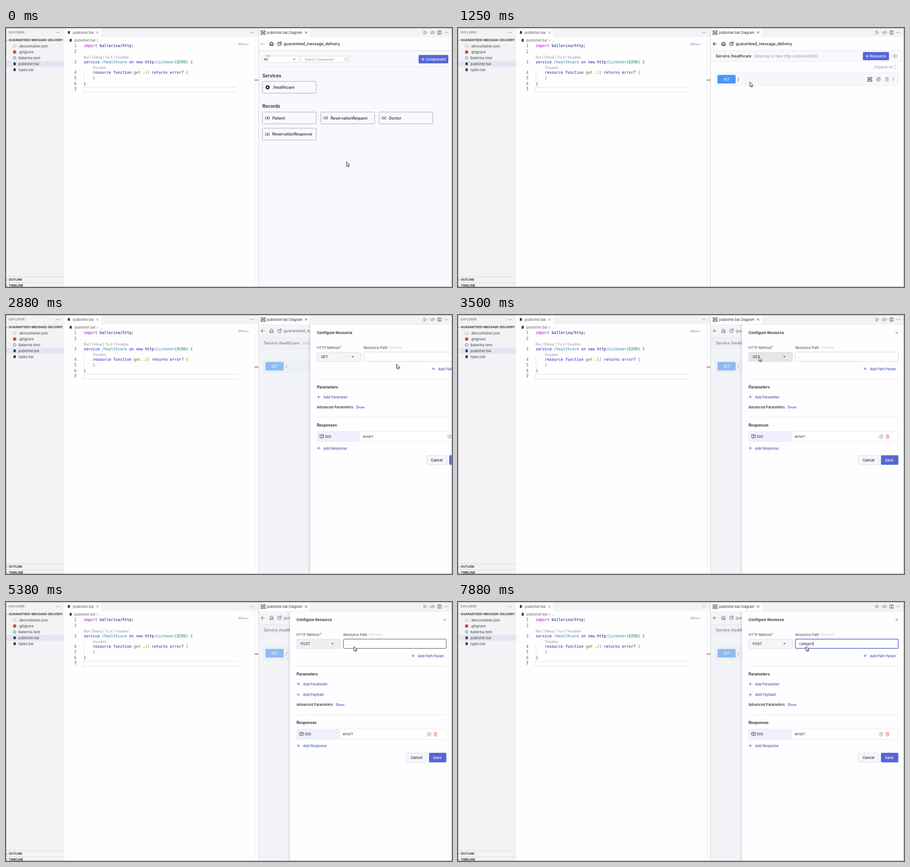
These frames come from a looping animation (981 by 571 pixels, 8000 ms). An HTML page with a canvas:

```html
<!DOCTYPE html>
<html lang="en">
<head>
<meta charset="utf-8">
<title>Service designer</title>
<style>
html, body { margin: 0; width: 100%; height: 100%; overflow: hidden; background: #fff; }
canvas { display: block; width: 981px; height: 571px; }
</style>
</head>
<body>
<canvas id="stage"></canvas>
<script>
const W = 981, H = 571, LOOP = 8000, TICK = 125;
const canvas = document.getElementById('stage');
const ctx = canvas.getContext('2d');
const dpr = window.devicePixelRatio || 1;
canvas.width = Math.round(W * dpr);
canvas.height = Math.round(H * dpr);

const UI = 'Inter, sans-serif', MONO = '"DejaVu Sans Mono", monospace';
const INK = '#25262b', BLUE = '#5567d5', LINK = '#4557bd', RED = '#dd6b4f', LINE = '#dfe1e8';

const clamp = v => Math.max(0, Math.min(1, v));
const mix = (a, b, p) => a + (b - a) * p;
const smooth = p => p * p * (3 - 2 * p);
const span = (t, a, b) => clamp((t - a) / (b - a));

// y is the middle of the capitals
function text(s, x, y, size, color = INK, weight = 400, align = 'left') {
  ctx.font = `${weight} ${size}px ${UI}`;
  ctx.fillStyle = color;
  ctx.textAlign = align;
  ctx.fillText(s, x, y + size * 0.36);
}

function rect(x, y, w, h, color) {
  ctx.fillStyle = color;
  ctx.fillRect(x, y, w, h);
}

function box(x, y, w, h, r, fill, stroke, lw = 0.8) {
  ctx.beginPath();
  ctx.roundRect(x, y, w, h, r);
  if (fill) { ctx.fillStyle = fill; ctx.fill(); }
  if (stroke) { ctx.strokeStyle = stroke; ctx.lineWidth = lw; ctx.stroke(); }
}

// Path drawn around its own centre
function icon(d, x, y, color, lw = 1, fill) {
  const path = new Path2D(d);
  ctx.save();
  ctx.translate(x, y);
  if (fill) { ctx.fillStyle = fill; ctx.fill(path); }
  if (lw) { ctx.strokeStyle = color; ctx.lineWidth = lw; ctx.stroke(path); }
  ctx.restore();
}

function circle(x, y, r, fill, stroke, lw = 1) {
  ctx.beginPath();
  ctx.arc(x, y, r, 0, 7);
  if (fill) { ctx.fillStyle = fill; ctx.fill(); }
  if (stroke) { ctx.strokeStyle = stroke; ctx.lineWidth = lw; ctx.stroke(); }
}

function gear(x, y, r, color, lw) {
  circle(x, y, r * 0.68, null, color, lw);
  for (let i = 0; i < 8; i++) {
    const c = Math.cos(i * Math.PI / 4), s = Math.sin(i * Math.PI / 4);
    icon(`M${c * r * .75} ${s * r * .75}L${c * r} ${s * r}`, x, y, color, lw);
  }
}

function dots(x, y) {
  for (const d of [-3, 0, 3]) circle(x + d, y, 0.7, '#4a4a4e');
}

const PLUS = 'M-3.5 0H3.5M0 -3.5V3.5';
const CROSS = 'M-2.5 -2.5L2.5 2.5M2.5 -2.5L-2.5 2.5';
const CHEVRON = 'M-1.3 -2.6L1.3 0L-1.3 2.6';
const DOWN = 'M-2.8 -1.3H2.8L0 1.5Z', UP = 'M-2.8 1.3H2.8L0 -1.5Z';
const DIAGRAM = 'M-4.5 -4H4.5V-1H-4.5ZM-4.5 1.5H4.5V4.5H-4.5ZM0 -1V1.5';
const TRASH = 'M-3.5 -2.5H3.5M-1.3 -2.5V-3.8H1.3V-2.5M-2.7 -2.5V4H2.7V-2.5M-0.9 -0.5V2M0.9 -0.5V2';
const EDIT = 'M1 -3.8A4 4 0 1 0 3.9 0M-1.2 1.2L-0.8 -0.8L2.9 -4.2L4.2 -2.9L0.8 0.8Z';
const HOME = 'M-4.6 0L0 -4.3L4.6 0M-3.3 -1V4H-1V1H1V4H3.3V-1';
const CUBE = 'M-1 -3.5L4 -4.5V2L1.5 4L-3.7 3.5V-1.5ZM-3.7 -1.5L1.5 -1L4 -4.5M1.5 -1V4M-4 -4L-1.5 -2.5';

function sidebar() {
  rect(0, 0, 128, H, '#f3f2f5');
  text('EXPLORER', 6, 10, 6.85, '#66666b');
  dots(114, 10);
  icon('M-2 -1L0 1L2 -1', 1, 27, '#444', 0.9);
  text('GUARANTEED-MESSAGE-DELIVERY', 6, 27, 6.74, '#3a3a3e', 700);
  rect(0, 72.5, 128, 13, '#e3e5f0');
  ['.devcontainer.json', '.gitignore', 'Ballerina.toml', 'publisher.bal', 'types.bal']
    .forEach((name, i) => text(name, 27.3, 40.2 + i * 12.95, 7.55, '#424247'));
  icon('M-1 -3.3Q-2.7 -3.3 -2.5 -1.5Q-2.5 0 -3.7 0Q-2.5 0 -2.5 1.5Q-2.7 3.3 -1 3.3' +
       'M1 -3.3Q2.7 -3.3 2.5 -1.5Q2.5 0 3.7 0Q2.5 0 2.5 1.5Q2.7 3.3 1 3.3', 19, 40, '#e39a48');
  circle(19, 53, 3.7, '#c8532f');
  gear(19, 66, 3.9, '#3f8fd0', 1);
  rect(16.5, 76, 5, 6, '#3b3b40');
  rect(16.5, 89, 5, 6, '#3b3b40');
  [['OUTLINE', 555], ['TIMELINE', 568]].forEach(([name, y]) => {
    rect(0, y - 7, 128, 0.8, '#d3d2d6');
    icon(CHEVRON, 1, y, '#555', 0.9);
    text(name, 6, y, 6.8, '#3a3a3e', 700);
  });
}

const KEY = '#1414cc', NAVY = '#001080', TEAL = '#267f99', GREEN = '#319331', BRACE = '#0431fa';
const CODE = [
  [42.3, 0, [['import', '#af00db'], [' ballerina/http', NAVY], [';', '#222']]],
  [77.8, 0, [['service ', KEY], ['/healthcare ', TEAL], ['on new ', KEY], ['http', NAVY], [':', '#222'],
    ['Listener', TEAL], ['(', BRACE], ['8290', '#098658'], [') {', BRACE]]],
  [101.2, 4, [['resource function ', KEY], ['get ', '#795e26'], ['.', '#111'], ['() ', GREEN],
    ['returns error', KEY], ['? ', '#222'], ['{', GREEN]]],
  [113.4, 4, [['}', GREEN]]],
  [125.8, 0, [['}', BRACE]]]
];

function editor() {
  rect(128, 0, 428, H, '#fefefe');
  rect(128, 0, 428, 20, '#f3f2f5');
  rect(128, 0, 81, 20, '#fefefe');
  rect(136, 6.8, 4.6, 6, '#3b3b40');
  text('publisher.bal', 147, 10, 7.6, '#55555a');
  icon(CROSS, 201, 10, '#77777c', 0.8);
  dots(541, 10);
  rect(140, 24, 4.6, 6, '#3b3b40');
  text('publisher.bal', 150.5, 27, 7.6, '#66666b');
  icon(CHEVRON, 201, 27.2, '#77777c', 0.8);
  text('...', 206, 27, 7.6, '#66666b');

  text('Run | Debug | Try it | Visualize', 171, 64, 6.95, '#8b8b90');
  text('Visualize', 191, 87, 6.95, '#8b8b90');
  rect(171, 92, 0.8, 25, '#dcdce0');
  ctx.strokeStyle = '#dedee2';
  ctx.lineWidth = 1;
  ctx.strokeRect(170.5, 130.5, 338, 11);
  rect(508, 129, 2, 14, '#fefefe');

  ctx.font = `8.305px ${MONO}`;
  ctx.textAlign = 'right';
  [42.3, 54.5, 77.8, 101.2, 113.4, 125.8, 138.2].forEach((y, i) => {
    ctx.fillStyle = i === 6 ? '#0b216f' : '#237893';
    ctx.fillText(i + 1, 155, y);
  });
  ctx.textAlign = 'left';
  for (const [y, indent, parts] of CODE) {
    let x = 171 + indent * 5;
    for (const [s, color] of parts) {
      ctx.fillStyle = color;
      ctx.fillText(s, x, y);
      x += ctx.measureText(s).width;
    }
  }

  [[0, 10], [2, 24], [3.2, 21], [4.4, 2]].forEach(([dy, w]) => rect(511, 33.3 + dy, w, 0.8, '#9aa3cd'));
  rect(547, 20, 0.8, H, '#e8e8ec');
  rect(547, 114, 8.5, 1.4, '#5a5a5e');
}

function panelTabs() {
  rect(556, 0, 425, 20, '#f3f2f5');
  rect(556, 0, 112, 20, '#fefefe');
  icon(DIAGRAM, 565.5, 10, '#333', 1.1);
  text('publisher.bal Diagram', 574, 10, 7.58, '#333338');
  icon(CROSS, 660, 10, '#444', 0.9);
  icon('M-2.7 -3.7L3.4 0L-2.7 3.7Z', 922, 10, '#388a34', 0.9);
  icon('M-2.3 -2.8L-4.6 0L-2.3 2.8M2.3 -2.8L4.6 0L2.3 2.8M1 -3.6L-1 3.6', 938, 10, '#444', 0.9);
  icon('M-3.6 -3.6H3.6V3.6H-3.6ZM0 -3.6V3.6', 953.5, 10, '#444', 0.9);
  dots(968.5, 10);
}

function panelHeader(backColor) {
  rect(556, 20, 425, 30, '#fefefe');
  icon('M4 0H-3.5M-0.3 -3.3L-3.6 0L-0.3 3.3', 565, 35, backColor, 1.2);
  icon(HOME, 584, 35, INK, 1.2);
  icon(CUBE, 601.5, 35, INK, 0.9);
  text('guaranteed_message_delivery', 611, 35, 8.5, INK, 500);
  rect(556, 49.5, 425, 1, '#d9dbe2');
}

function card(label, x, y, cursor, isService) {
  const over = cursor.x >= x && cursor.x <= x + 118.5 && cursor.y >= y && cursor.y <= y + 26;
  box(x, y, 118.5, 26, 3, over ? '#eef0fb' : '#f8f9fc', over ? BLUE : '#989fae', 0.9);
  if (isService) {
    circle(x + 11.5, y + 13, 2.9, null, INK, 2.2);
    gear(x + 11.5, y + 13, 4.8, INK, 1.4);
  } else {
    ctx.font = 'italic 600 8.3px "Noto Serif", serif';
    ctx.fillStyle = INK;
    ctx.textAlign = 'left';
    ctx.fillText('x', x + 8.6, y + 15.5);
    text('(', x + 5.3, y + 13, 8.5);
    text(')', x + 13.3, y + 13, 8.5);
  }
  text(label, x + (isService ? 23 : 21.7), y + 13.2, isService ? 8.65 : 8.45, INK, 500);
}

function overview(cursor) {
  rect(556, 20, 425, H, '#f8f9fc');
  panelHeader('#c3c5ca');
  box(564, 61.5, 79.5, 14.5, 2, '#fff', '#cdd0d8');
  rect(570, 60, 13, 3, '#f8f9fc');
  text('File', 571.8, 61.5, 6, '#77797f');
  text('All', 567, 69, 7.8);
  icon(DOWN, 634, 69, '', 0, '#777');
  box(649, 62, 108, 14, 2, '#fff', '#cdd0d8');
  text('Search Component', 657, 69, 7.1, '#85878d');
  circle(748.5, 68.8, 3.4, null, '#9a9ca3', 0.8);
  icon('M2.4 2.4L4 4', 748.5, 68.8, '#9a9ca3', 0.8);
  box(907.5, 59.5, 65.5, 18.5, 2, BLUE);
  icon(PLUS, 917, 69, '#fff', 1.2);
  text('Component', 923, 69, 8, '#fff', 500);
  rect(564, 85, 409, 0.8, LINE);
  text('Services', 564, 105, 9.8, INK, 600);
  card('/healthcare', 564, 117.7, cursor, true);
  text('Records', 564, 172.5, 9.8, INK, 600);
  card('Patient', 564, 185.3, cursor);
  card('ReservationRequest', 692.3, 185.3, cursor);
  card('Doctor', 820.5, 185.3, cursor);
  card('ReservationResponse', 564, 221, cursor);
}

function servicePage() {
  rect(556, 20, 425, H, '#fefeff');
  panelHeader(INK);
  rect(556, 50.5, 425, 23.5, '#f8f9fc');
  rect(556, 74, 425, 0.8, '#e4e6ec');
  text('Service /healthcare', 567, 62.3, 8.4, INK, 500);
  text('listening on new http:Listener(8290)', 652, 62.3, 8.2, '#94969d');
  box(890.5, 53, 57.5, 18, 2, BLUE);
  icon(PLUS, 900, 62, '#fff', 1.2);
  text('Resource', 905.4, 62.2, 8.05, '#fff', 500);
  circle(961.5, 62, 4, null, '#85878d', 0.8);
  circle(961.5, 62, 1.3, null, '#85878d', 0.9);
  text('Expand All', 916, 86, 8.05, '#94969d');
  icon('M-2.3 -1.5L0 -4L2.3 -1.5M-2.3 1.5L0 4L2.3 1.5', 962, 85.7, '#85878d', 0.9);
  box(566, 98.5, 404, 28.5, 3, '#f3f8fd', '#e0ebf6');
  box(570.7, 103.5, 40, 19, 2, '#4897f6');
  text('GET', 590.7, 113, 7, '#fff', 500, 'center');
  text('/', 615, 113.5, 9.5, INK);
  icon(DIAGRAM, 905.7, 113, INK, 1);
  icon(EDIT, 925, 113, '#55575c', 1);
  icon(TRASH, 943.7, 112.8, RED, 0.9);
  icon(CHEVRON, 957.5, 113, '#7280a8', 1);
}

function addLink(label, x, y) {
  icon(PLUS, x, y, LINK, 0.9);
  text(label, x + 10.5, y + 0.3, 7.5, LINK, 500);
}

function pathField(t, cursor) {
  const hover = cursor.x > 742 && cursor.y > 81 && cursor.y < 103;
  const focus = t >= 5500;
  box(742.3, 81.8, 226, 20.5, 2, '#fff', focus ? BLUE : hover ? '#333' : '#cdd0d8', focus ? 1.5 : 0.9);
  const typed = t < 6250 ? 0 : t >= 7875 ? 8 : Math.floor((t - 6000) / 250);
  const value = typed ? 'categori'.slice(0, typed) : '.';
  text(value, 750.5, 92.2, 7.8);
  if (focus) rect(750.7 + ctx.measureText(value).width, 87.5, 0.8, 9, '#222');
}

const OPTIONS = ['Select', 'GET', 'PUT', 'DELETE', 'POST', 'PATCH'];

function menu(opacity, cursor) {
  ctx.save();
  ctx.globalAlpha = opacity;
  ctx.shadowColor = 'rgba(0,0,0,.22)';
  ctx.shadowBlur = 5;
  ctx.shadowOffsetY = 1.5;
  box(640, 105.5, 95.5, 137.5, 2, '#fff');
  ctx.shadowColor = 'transparent';
  OPTIONS.forEach((name, i) => {
    const y = 121 + i * 21.4;
    if (i === 1) rect(640, y - 10.7, 95.5, 21.4, '#e9e9eb');
    else if (i && Math.abs(cursor.y - y) < 10.7) rect(640, y - 10.7, 95.5, 21.4, '#f4f4f6');
    text(name, 649.7, y + 0.2, 7.65, i ? INK : '#909298');
  });
  ctx.restore();
}

function drawer(t, cursor) {
  const x = mix(357, 0, 1 - (1 - span(t, 2625, 3125)) ** 3);
  if (x >= 357) return;
  const posted = t >= 4875;
  const shift = posted ? 23.3 : 0;
  const menuOpacity = posted ? 0.5 * (1 - span(t, 4875, 5000)) : t < 3750 ? 0 : t < 3875 ? 0.6 : 1;

  ctx.save();
  ctx.beginPath();
  ctx.rect(556, 20.5, 425, H);
  ctx.clip();
  ctx.translate(x, 0);
  ctx.save();
  ctx.shadowColor = 'rgba(0,0,0,.28)';
  ctx.shadowBlur = 7;
  rect(624.5, 10, 370, H + 10, '#fefdff');
  ctx.restore();

  text('Configure Resource', 639, 39, 8.15, INK, 600);
  icon(CROSS, 965, 39, '#77797f', 0.9);
  text('HTTP Method', 639, 72, 7.6, '#44464c');
  text('*', 689.5, 71.5, 8, '#c0392b');
  text('Resource Path', 742, 71.8, 7.68, '#44464c');
  text('Optional', 798, 71.8, 7.3, '#c6c8ce');

  const over = t >= 3125 && cursor.x < 736 && cursor.y > 81 && cursor.y < 103 && t < 3875;
  box(639.5, 82, 96.3, 20.5, 2, over ? '#e5e6e8' : posted && t < 5500 ? '#eeeff1' : '#f4f5f7', '#d5d7de');
  text(posted ? 'POST' : 'GET', 648, 92.2, 7.9);
  icon(t >= 3750 && !posted ? UP : DOWN, 718, 92, '', 0, '#555');
  pathField(t, cursor);
  addLink('Add Path Param', 895.5, 118.7);

  rect(639, 140.8, 329.5, 0.8, LINE);
  text('Parameters', 639, 158.5, 8.45, INK, 600);
  addLink('Add Parameter', 643, 180.8);
  if (posted) addLink('Add Payload', 643, 204.2);

  ctx.save();
  ctx.translate(0, shift);
  text('Advanced Parameters', 639, 203.4, 7.55, INK, 500);
  text('Show', 725, 203.4, 7.3, LINK, 500);
  rect(639, 225, 329.5, 0.8, LINE);
  text('Responses', 639, 242.7, 8.3, INK, 600);
  box(639.5, 256.7, 329, 22.5, 2, '#fff', '#e3e4ec');
  rect(640, 257, 94, 22, '#eef0fb');
  icon('M-4 -3.7H4V2.3H1.5L0 4.2L-1 2.3H-4ZM-1.2 -1.5Q0 -3 1.2 -1.5Q1.2 -.5 0 0V1', 650, 268, INK, 0.9);
  text('500', 657, 268.2, 7.5);
  text('error?', 740.7, 268, 8);
  icon(EDIT, 930.8, 268.3, '#85878d', 0.9);
  icon(TRASH, 944.7, 268, RED, 0.9);
  addLink('Add Response', 643, 293.5);
  box(880.3, 309.7, 45.3, 20.3, 2, '#f5f6f9', '#d2d5de');
  text('Cancel', 903, 320, 7.8, INK, 500, 'center');
  box(930.3, 309.3, 38.3, 21, 2, BLUE);
  text('Save', 948.6, 320, 8, '#fff', 500, 'center');
  ctx.restore();

  if (menuOpacity > 0) menu(menuOpacity, cursor);
  ctx.restore();
}

// start, end, target x, target y
const MOVES = [
  [0, 500, 642, 119.3],
  [1500, 1750, 879, 111],
  [1875, 2375, 928.3, 114],
  [2625, 3375, 662, 92.5],
  [4000, 4625, 672, 207.3],
  [4875, 5375, 765.3, 98.3]
];

function cursorAt(t) {
  const p = { x: 749, y: 295 };
  for (const [a, b, x, y] of MOVES) {
    const k = smooth(span(t, a, b));
    p.x = mix(p.x, x, k);
    p.y = mix(p.y, y, k);
  }
  return p;
}

function draw(t) {
  const cursor = cursorAt(t);
  ctx.setTransform(dpr, 0, 0, dpr, 0, 0);
  sidebar();
  editor();
  if (t < 1250) overview(cursor);
  else servicePage();
  if (t >= 2625) rect(556, 20.5, 425, H, 'rgba(228,231,238,.45)');
  drawer(t, cursor);
  panelTabs();
  rect(555, 0, 0.9, H, '#cfcfd4');
  icon('M0 0V9.8L2.3 7.8L3.9 11.3L5.5 10.5L4 7.2H7Z', cursor.x, cursor.y, '#222', 1, '#fff');
  ctx.strokeStyle = '#a9a9ad';
  ctx.lineWidth = 1;
  ctx.strokeRect(0.5, 0.5, W - 1, H - 1);
}

const start = performance.now();
function frame() {
  const t = (performance.now() - start) % LOOP;
  draw(Math.floor(t / TICK) * TICK);
  requestAnimationFrame(frame);
}
frame();
</script>
</body>
</html>
```
